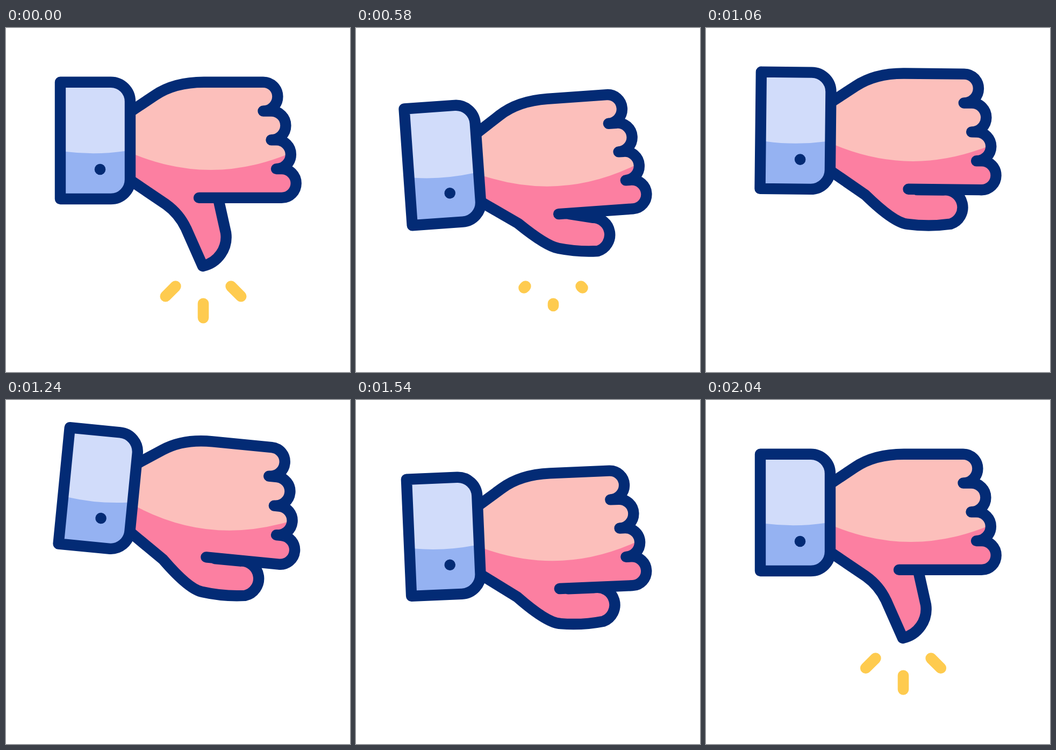
Recreate the animation shown at these times as an HTML page. Size 640 by 640 pixels, loop 2.4 s.

```html
<!DOCTYPE html>
<html lang="en">
<head>
<meta charset="utf-8">
<title>Thumbs down</title>
<style>
  html, body { margin: 0; width: 100%; height: 100%; overflow: hidden; background: #fff; }
  svg { display: block; width: 100%; height: 100%; }
  .line { fill: none; stroke: #032b75; stroke-width: 20.4; stroke-linecap: round; stroke-linejoin: round; }
  .spark { fill: none; stroke: #fecb4f; stroke-width: 20.6; stroke-linecap: round; }
</style>
</head>
<body>
<svg viewBox="0 0 640 640">
  <defs>
    <path id="cuff" d="M101 100.7H195A36 36 0 0 1 231 136.7V282A36 36 0 0 1 195 318H101Z"/>
  </defs>
  <g id="arm">
    <path id="palm" fill="#fc7fa1"/>
    <path id="skin" fill="#fcbfbb"/>
    <path id="outline" class="line"/>
    <use href="#cuff" fill="#95b2f2"/>
    <path fill="#d1dcfa" d="M101 100.7H195A36 36 0 0 1 231 136.7V228L221 229Q166 237 111 230L101 228Z"/>
    <use href="#cuff" class="line"/>
    <circle cx="175" cy="263" r="10.3" fill="#032b75"/>
  </g>
  <path id="sparks" class="spark"/>
</svg>
<script>
const LOOP = 2400, STEP = 20, END = 2040;
const PIVOT = "320 272";
const $ = id => document.getElementById(id);

// Turning points of the shake as [ms, value]; the turn trails the drop
const DROP = [[215, 0], [690, 39], [1210, -30], [1585, 40], [END, 0]];
const TURN = [[265, 0], [785, -6.05], [1300, 6], [1680, -6.05], [END, 0]];

// Key points of the thumb: [open, tucked]
const THUMB = {
  root: [[395, 318], [393, 317]],
  bend: [[409, 381], [441, 317]],
  tip: [[366, 443], [456, 380]],
  under: [[350.5, 408], [416, 386]],
  base: [[335, 373], [376, 381]],
  hollow: [[322, 345.5], [351, 379]],
};
const BULGE = [14.8, 29.7];
const CREASE = [359, 377];

const knuckle = "a26.9 26.9 0 0 1 0 53.8";
const back = `M231 156L277 125.2C303 107.5 335 100.7 368 100.7H478.5${knuckle}H493.5${knuckle}H503`;
const hand = back + knuckle + "H512.8" + knuckle;
$("skin").setAttribute("d", back + "a26.9 26.9 0 0 1 26.9 26.9L521 236Q381 292 241 236L231 231Z");

const mix = ([a, b], k) => a + (b - a) * k;
const mixPoint = ([a, b], k) => [0, 1].map(i => mix([a[i], b[i]], k));

function ease(t, from, to) {
  const p = Math.min(1, Math.max(0, (t - from) / (to - from)));
  return (1 - Math.cos(Math.PI * p)) / 2;
}

// Sum of eased moves from each turning point to the next
function swing(keys, t) {
  return keys.slice(1).reduce((sum, [time, value], i) => {
    const [before, from] = keys[i];
    return sum + (value - from) * ease(t, before, time);
  }, 0);
}

// Circular arc from a to b that stands out by the given height
function arc(a, b, height) {
  const half = Math.hypot(b[0] - a[0], b[1] - a[1]) / 2;
  const r = (half * half + height * height) / (2 * height);
  return `A${r} ${r} 0 ${height > half ? 1 : 0} 1 ${b}`;
}

function thumbPath(tuck) {
  const p = {};
  for (const name in THUMB) p[name] = mixPoint(THUMB[name], tuck);
  return `${p.root}L${p.bend}${arc(p.bend, p.tip, mix(BULGE, tuck))}`
    + `Q${p.under} ${p.base}Q${p.hollow} 297.5 328L231 283`;
}

function drawArm(t) {
  $("arm").setAttribute("transform", `translate(0 ${swing(DROP, t)}) rotate(${swing(TURN, t)} ${PIVOT})`);
  const tuck = ease(t, 200, 712) - ease(t, 1565, END);
  const thumb = thumbPath(tuck);
  $("palm").setAttribute("d", `${hand}L${thumb}Z`);
  $("outline").setAttribute("d", `${hand}H${mix(CREASE, tuck)}M${thumb}`);
}

function drawSparks(t) {
  const length = 26.3 * (1 - ease(t, 200, 712) + ease(t, 1800, 2065));
  const d = [-1, 0, 1].map(side => {
    const reach = length / Math.hypot(side, 1);
    const x = 367 + 51.6 * side, y = 512.8 - 32.2 * Math.abs(side);
    return `M${x} ${y}l${(reach * side).toFixed(3)} ${reach.toFixed(3)}`;
  }).join("");
  $("sparks").setAttribute("d", length > 0.02 ? d : "");
}

const start = performance.now();

function frame() {
  const elapsed = (performance.now() - start) % LOOP;
  const t = Math.min(END, Math.floor(elapsed / STEP) * STEP);
  drawArm(t);
  drawSparks(t);
  requestAnimationFrame(frame);
}
frame();
</script>
</body>
</html>
```
